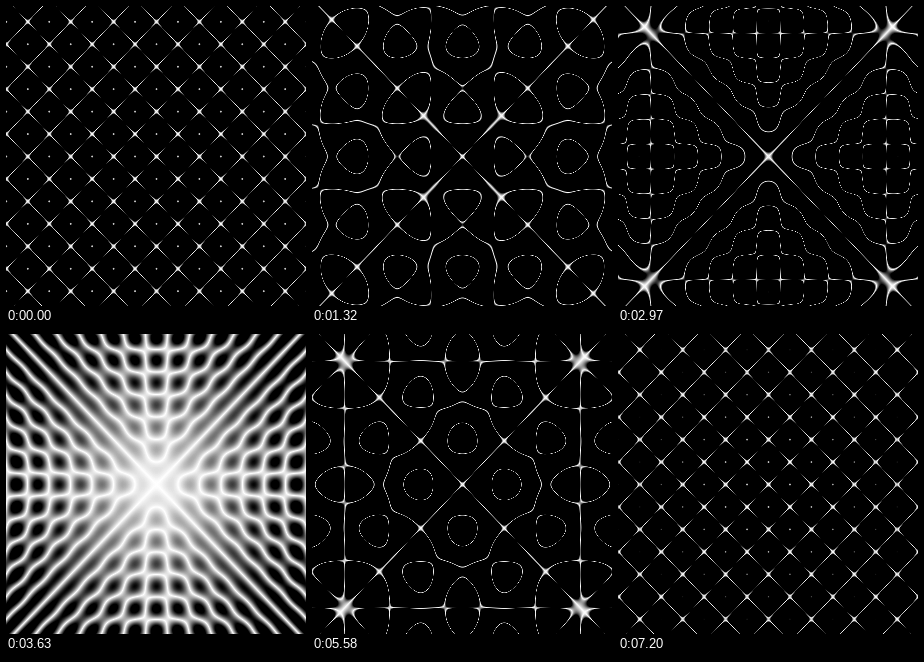
Animation of 300 by 300 pixels, one loop 7.23 s. Source, as an HTML page with a canvas:

```html
<!DOCTYPE html>
<html lang="en">
<head>
<meta charset="utf-8">
<title>Standing waves</title>
<style>
  html, body { margin: 0; width: 100%; height: 100%; overflow: hidden; background: #000; }
  canvas { display: block; width: 100vw; height: 100vh; image-rendering: pixelated; }
</style>
</head>
<body>
<canvas id="plate" width="300" height="300"></canvas>
<script>
  const SIZE = 300;
  const STEP_MS = 30;
  const STEPS = 241;
  const CENTRE = 150;
  const HALF_WAVE_X = 21.45;
  const HALF_WAVE_Y = 22.45;
  const LINE_WIDTH = 0.06;
  const PEAK_WIDTH = 0.01;

  const ctx = document.getElementById('plate').getContext('2d');
  const image = ctx.createImageData(SIZE, SIZE);
  const pixels = new Uint32Array(image.data.buffer);

  const wave = (halfWave, ratio) => Float64Array.from({ length: SIZE },
    (_, i) => Math.cos((i - CENTRE) * Math.PI / halfWave * ratio));

  const fixedX = wave(HALF_WAVE_X, 1);
  const fixedY = wave(HALF_WAVE_Y, 1);

  // Bright along the nodal lines, with a faint spot at full amplitude.
  function brightness(amp) {
    const line = 1 - amp / LINE_WIDTH;
    const peak = 0.8 * Math.exp(-(((2 - amp) / PEAK_WIDTH) ** 2));
    return Math.round(255 * Math.max(line, peak));
  }

  const LEVELS = 4000;
  const shades = Uint32Array.from({ length: LEVELS + 1 },
    (_, i) => 0xff000000 + brightness(2 * i / LEVELS) * 0x010101);

  function draw(step) {
    const ratio = 1 - Math.abs(1 - 2 * step / STEPS);
    const slowX = wave(HALF_WAVE_X, ratio);
    const slowY = wave(HALF_WAVE_Y, ratio);
    let p = 0;
    for (let y = 0; y < SIZE; y++) {
      for (let x = 0; x < SIZE; x++) {
        const amp = Math.abs(slowX[x] * fixedY[y] - fixedX[x] * slowY[y]);
        pixels[p++] = shades[Math.round(amp / 2 * LEVELS)];
      }
    }
    ctx.putImageData(image, 0, 0);
  }

  const start = performance.now();
  let shown = -1;

  function tick() {
    const elapsed = Math.max(0, performance.now() - start);
    const step = Math.floor(elapsed / STEP_MS) % STEPS;
    if (step !== shown) draw(shown = step);
    requestAnimationFrame(tick);
  }
  tick();
</script>
</body>
</html>
```
